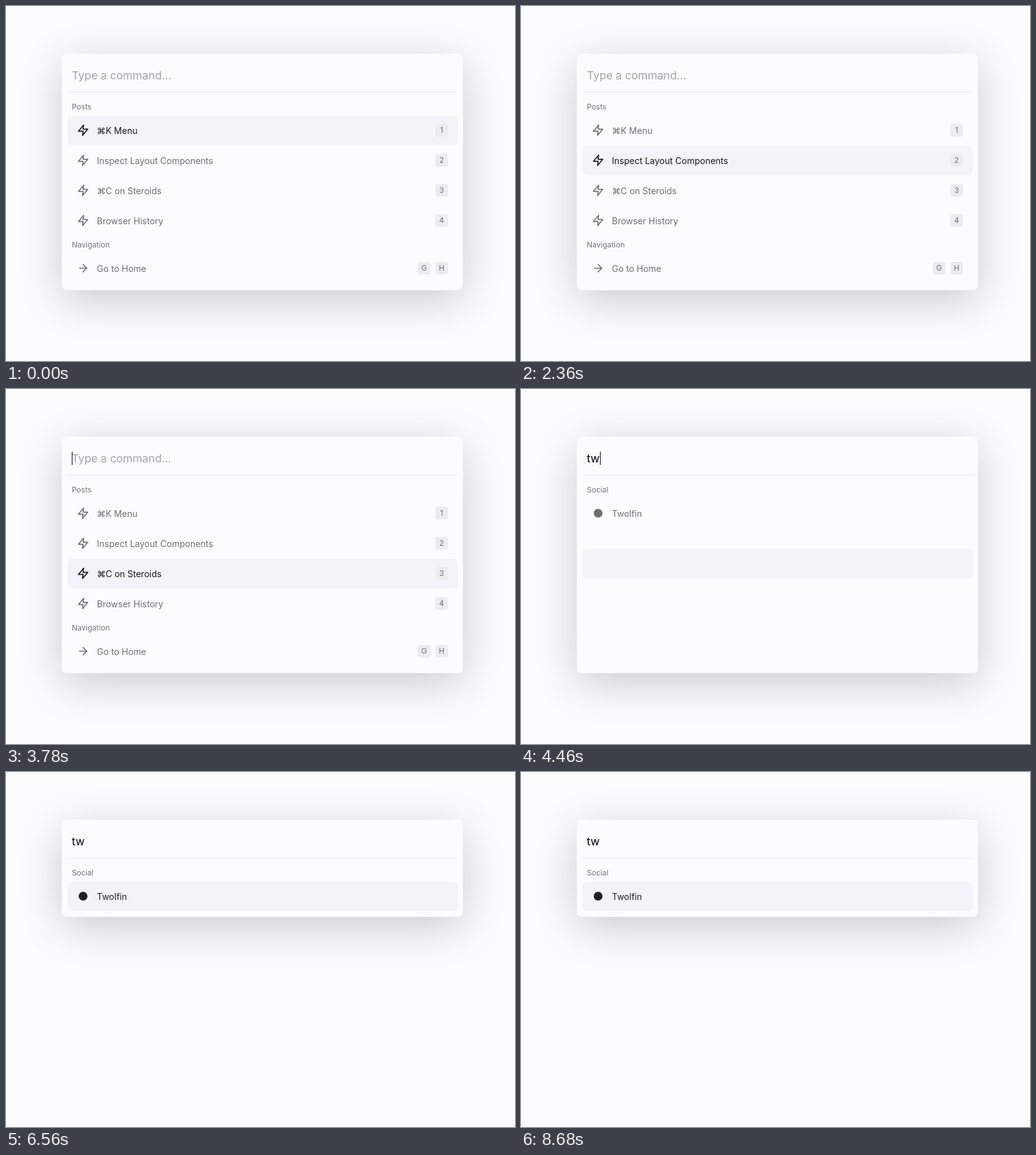
Animation of 812 by 566 pixels, one loop 8.7 s. Source, as an HTML page:

```html
<!DOCTYPE html>
<html lang="en">
<head>
<meta charset="utf-8">
<title>Command menu</title>
<style>
html, body { margin: 0; width: 100%; height: 100%; overflow: hidden; background: #fcfcfe; }
body { position: relative; font: 14px Inter, sans-serif; }
body div { position: absolute; white-space: pre; }
#panel {
  left: 89px; top: 76px; width: 640px; border-radius: 8px; background: #fcfcfe;
  box-shadow: 0 16px 70px rgba(0, 0, 0, .2);
}
#rule { left: 98px; top: 137px; width: 623px; height: 1px; background: #ebebf1; }
#glow { left: 98px; width: 623px; height: 47px; border-radius: 7px; background: #f3f4fa; }
#query { left: 105px; top: 98px; font-size: 17.6px; line-height: 26px; }
#caret { top: 100px; width: 1px; height: 21px; background: #000; }
.head { left: 105px; font-size: 12px; line-height: 21px; color: #73737a; }
.item { left: 98px; width: 623px; height: 47px; line-height: 47px; color: #6f6f74; }
.item > div { left: 47px; }
.item svg { position: absolute; left: 15px; top: 13px; fill: none; stroke: currentColor;
  stroke-width: 2; stroke-linecap: round; stroke-linejoin: round; }
.item .key { left: auto; top: 13px; width: 20px; height: 20px; border-radius: 4px;
  background: #ebebf0; color: #6f6f74; font-size: 12px; line-height: 20px; text-align: center; }
.item .dot { left: 18px; top: 16px; width: 14px; height: 14px; border-radius: 50%; background: currentColor; }
</style>
</head>
<body>
<div id="panel"></div>
<div id="rule"></div>
<div id="glow"></div>
<div id="query"></div>
<div id="caret"></div>
<div id="full"></div>
<div id="found"></div>
<script>
const LOOP = 8700, TYPE_T = 4360, TYPE_W = 4440, BLINK = 1150;
const $ = id => document.getElementById(id);
const [panel, glow, query, caret, full, found] =
  ['panel', 'glow', 'query', 'caret', 'full', 'found'].map($);

const svg = d => `<svg width="20" height="20" viewBox="0 0 24 24"><path d="${d}"/></svg>`;
const bolt = svg('M13 2 3 14h9l-1 8 10-12h-9z');
const arrow = svg('M5 12h14M12 5l7 7-7 7');
const head = (y, text) => `<div class="head" style="top:${y}px">${text}</div>`;
const item = (y, icon, text, keys = '') =>
  `<div class="item" style="top:${y}px">${icon}<div>${text}</div>` +
  [...keys].reverse().map((k, i) => `<div class="key" style="right:${16 + 28 * i}px">${k}</div>`).join('') +
  '</div>';

const posts = ['⌘K Menu', 'Inspect Layout Components', '⌘C on Steroids', 'Browser History'];
full.innerHTML = head(150, 'Posts') +
  posts.map((p, i) => item(175 + 48 * i, bolt, p, `${i + 1}`)).join('') +
  head(370, 'Navigation') + item(395, arrow, 'Go to Home', 'GH');
found.innerHTML = head(150, 'Social') + item(175, '<div class="dot"></div>', 'Twolfin');
for (const list of [full, found]) list.style.left = list.style.top = 0;
const rows = full.querySelectorAll('.item'), hit = found.querySelector('.item');

// Standard CSS "ease" curve
function ease(x) {
  x = Math.min(1, Math.max(0, x));
  const curve = (a, b, s) => 3 * a * s * (1 - s) ** 2 + 3 * b * s * s * (1 - s) + s ** 3;
  let lo = 0, hi = 1;
  for (let i = 0; i < 20; i++) {
    const mid = (lo + hi) / 2;
    if (curve(.25, .25, mid) < x) lo = mid; else hi = mid;
  }
  return curve(.1, 1, lo);
}
const step = (t, start, length = 150) => ease((t - start) / length);

const idle = [111, 111, 116], active = [23, 23, 27];
const tint = k => `rgb(${idle.map((c, i) => c + (active[i] - c) * k)})`;

// The panel pauses briefly while it shrinks
const heights = [[4470, 377], [4500, 200], [4599, 200], [4600, 164], [4620, 159], [4660, 155]];
function panelHeight(t) {
  const i = heights.findIndex(p => p[0] > t);
  if (i === 0) return heights[0][1];
  if (i < 0) return heights.at(-1)[1];
  const [t0, h0] = heights[i - 1], [t1, h1] = heights[i];
  return h0 + (h1 - h0) * (t - t0) / (t1 - t0);
}

// Each key press restarts the caret blink
const presses = [-575, 1600, 2600, TYPE_T, TYPE_W];

function draw(now) {
  const t = now % LOOP;
  const second = step(t, 1600), third = step(t, 2600), up = step(t, TYPE_W);
  const typed = t < TYPE_T ? '' : t < TYPE_W ? 't' : 'tw';

  panel.style.height = panelHeight(t) + 'px';
  glow.style.top = 175 + 48 * (second + third) - 96 * up + 'px';

  const text = typed || 'Type a command...';
  if (query.textContent !== text) query.textContent = text;
  query.style.color = typed ? '#000' : '#a3a3a9';
  caret.style.left = 105 + (typed ? Math.ceil(query.getBoundingClientRect().width) : 0) + 'px';
  const press = presses.findLast(p => p <= t);
  caret.hidden = (t - press) % BLINK >= BLINK / 2;

  full.hidden = t >= TYPE_W;
  found.hidden = !full.hidden;
  [1 - second, second - third, third].forEach((k, i) => rows[i].style.color = tint(k));
  hit.style.color = tint(.9 * step(t, 4470, 200));
  requestAnimationFrame(draw);
}
requestAnimationFrame(draw);
</script>
</body>
</html>
```
